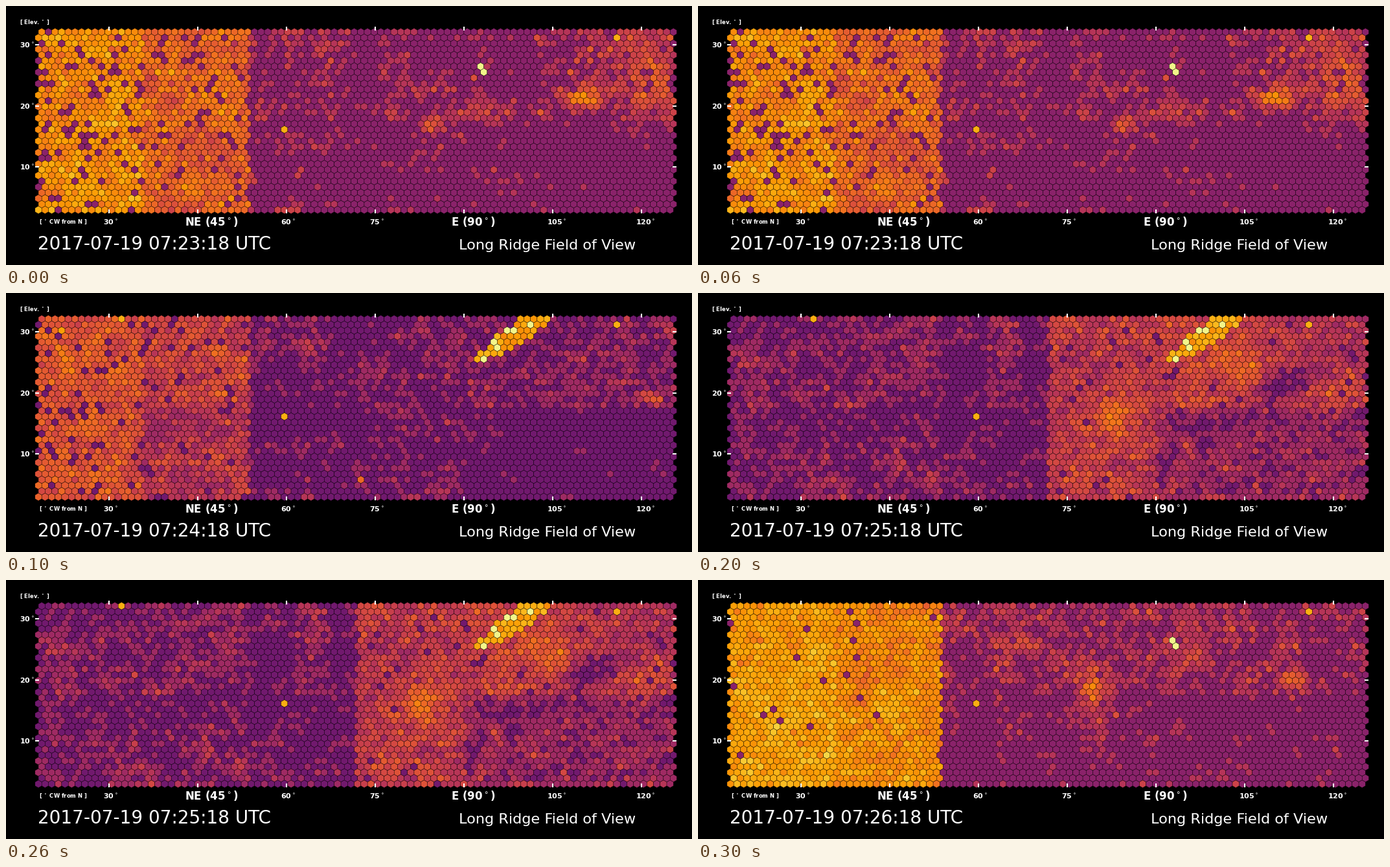
These frames come from a looping animation (1059x401 px, 400 ms). A matplotlib script:

```python
import numpy as np
import matplotlib.pyplot as plt
from matplotlib.animation import FuncAnimation
from matplotlib.collections import PolyCollection

W, H, DPI = 1059, 401, 100
COLS, ROWS = 96, 32
STEP_X, STEP_Y = 10.265, 8.885
LEFT, TOP = 50.0, 40.3
LOG_GAIN = 0.16                      # colour step per e-fold of pixel counts
CAMERA_EDGES = [213, 377, 540, 707, 870]
HORIZON_SPLIT = 178                  # border between upper and lower cameras

row, col = np.divmod(np.arange(ROWS * COLS), COLS)
X = LEFT + (col + 0.5 * (row % 2 == 0)) * STEP_X
Y = TOP + row * STEP_Y
camera = np.digitize(X, CAMERA_EDGES)

# Levels are relative to the colour floor; glows are x, y, x radius, y radius, level.
MINUTES = [
    dict(floor=.375, dead=.12, streak=False,
         upper=[.37, .29, .04, .01, .0, .05],
         lower=[.38, .27, -.03, -.04, -.05, -.08],
         glows=[(888, 140, 32, 18, .36), (995, 105, 50, 85, .25),
                (658, 185, 24, 24, .27), (742, 160, 45, 16, .20)]),
    dict(floor=.315, dead=.08, streak=True,
         upper=[.30, .24, .0, .05, .05, .07],
         lower=[.31, .19, -.04, .03, -.05, -.08],
         glows=[(1000, 162, 28, 13, .28), (475, 85, 40, 22, .20),
                (345, 100, 35, 18, .27)]),
    dict(floor=.315, dead=.05, streak=True,
         upper=[.07, .09, .04, .22, .23, .18],
         lower=[.03, .06, .0, .21, .12, .10],
         glows=[(635, 195, 40, 36, .33), (820, 108, 40, 30, .28),
                (905, 142, 26, 20, -.06), (1000, 160, 34, 15, .28)]),
    dict(floor=.375, dead=.015, streak=False,
         upper=[.41, .37, .05, .06, .05, .05],
         lower=[.43, .38, -.05, .0, -.03, -.04],
         glows=[(612, 170, 26, 42, .28), (762, 112, 45, 28, .18),
                (914, 155, 22, 14, .27), (495, 100, 35, 14, .24)]),
]
STEADY = [(178, 40), (943, 49), (425, 191)]
FLASH = [(733, 93), (738, 102)]
STREAK_PEAKS = [(738, 102), (753, 76), (758, 84), (774, 58), (784, 58), (809, 49)]


def nearest(x, y):
    return np.argmin((X - x) ** 2 + (Y - y) ** 2)


def clouds(rng, passes):
    """Unit-variance noise, smoothed over neighbouring pixels."""
    noise = rng.normal(size=(ROWS, COLS))
    for _ in range(passes):
        noise = sum(np.roll(noise, (dy, dx), (0, 1))
                    for dy in (-1, 0, 1) for dx in (-1, 0, 1))
    return (noise / noise.std()).ravel()


def streak_mask():
    """Slanted track that widens just behind its lower tip."""
    dx, dy = X - 728, Y - 104
    length = np.hypot(100, 68)
    along = (100 * dx - 68 * dy) / length
    across = (68 * dx + 100 * dy) / length
    half_width = np.interp(along, [25, 35], [6, 16])
    return (along > -3) & (along < 126) & (abs(across) < half_width)


def sky_colors(index):
    sky = MINUTES[index]
    rng = np.random.default_rng(40 + index)
    level = np.where(Y < HORIZON_SPLIT, np.take(sky["upper"], camera),
                     np.take(sky["lower"], camera))
    for x, y, rx, ry, peak in sky["glows"]:
        weight = np.exp(-((X - x) / rx) ** 2 - ((Y - y) / ry) ** 2)
        level += (peak - level) * weight
    # relative noise shrinks as counts grow
    spread = 1 / (1 + 3 * np.maximum(level, 0))
    level += spread * (0.07 * clouds(rng, 0) + 0.04 * clouds(rng, 2))
    level[(rng.random(X.size) < sky["dead"]) & (level > .15)] = 0
    counts = np.maximum(1, np.round(np.exp(level / LOG_GAIN)))
    value = sky["floor"] + LOG_GAIN * np.log(counts)

    for spot in STEADY:
        value[nearest(*spot)] = .82
    if sky["streak"]:
        lit = streak_mask()
        value[lit] = rng.uniform(.74, .84, lit.sum())
    for spot in STREAK_PEAKS if sky["streak"] else FLASH:
        value[nearest(*spot)] = .97
    return plt.cm.inferno(value)


plt.rcParams["font.family"] = "DejaVu Sans"
fig = plt.figure(figsize=((W + 1e-6) / DPI, (H + 1e-6) / DPI), dpi=DPI,
                 facecolor="black")
ax = fig.add_axes([0, 0, 1, 1])
ax.set(xlim=(0, W), ylim=(H, 0))
ax.axis("off")

angles = np.pi / 6 + np.arange(6) * np.pi / 3
hexagon = np.c_[np.cos(angles), np.sin(angles)] * STEP_X / np.sqrt(3)
cells = PolyCollection(np.c_[X, Y][:, None, :] + hexagon,
                       edgecolors="black", linewidths=0.27)
ax.add_collection(cells)


def label(x, y, text, size, weight="bold"):
    return ax.text(x, y, text, color="white", size=size, weight=weight,
                   ha="left", va="baseline")


def tick(xs, ys):
    ax.plot(xs, ys, color="white", lw=1.5, solid_capstyle="butt")


NAMED = {45: "NE", 90: "E"}
for i in range(7):
    x, azimuth = 159 + 137 * i, 30 + 15 * i
    tick([x, x], [32, 38])
    tick([x, x], [315, 321])
    if azimuth in NAMED:
        label(x - 19.7, 340, rf"{NAMED[azimuth]} ({azimuth}$^\circ$)", 12)
    else:
        label(x - 9.3, 339, rf"{azimuth}$^\circ$", 8)
for i in range(3):
    y = 60 + 94.6 * i
    tick([45, 51], [y, y])
    tick([1029, 1035], [y, y])
    label(20.5, y + 5, rf"{30 - 10 * i}$^\circ$", 8)

label(20.5, 28, r"[ Elev. $^\circ$ ]", 6)
label(50.5, 337, r"[ $^\circ$ CW from N ]", 6)
label(699, 377, "Long Ridge Field of View", 16.15, "normal")
clock = label(49.3, 377, "", 20.08, "normal")

palettes = [sky_colors(i) for i in range(len(MINUTES))]


def draw(frame):
    cells.set_facecolor(palettes[frame])
    clock.set_text(f"2017-07-19 07:{23 + frame}:18 UTC")
    return cells, clock


animation = FuncAnimation(fig, draw, frames=len(MINUTES), interval=100,
                          repeat=True, repeat_delay=0)
plt.show()
```
